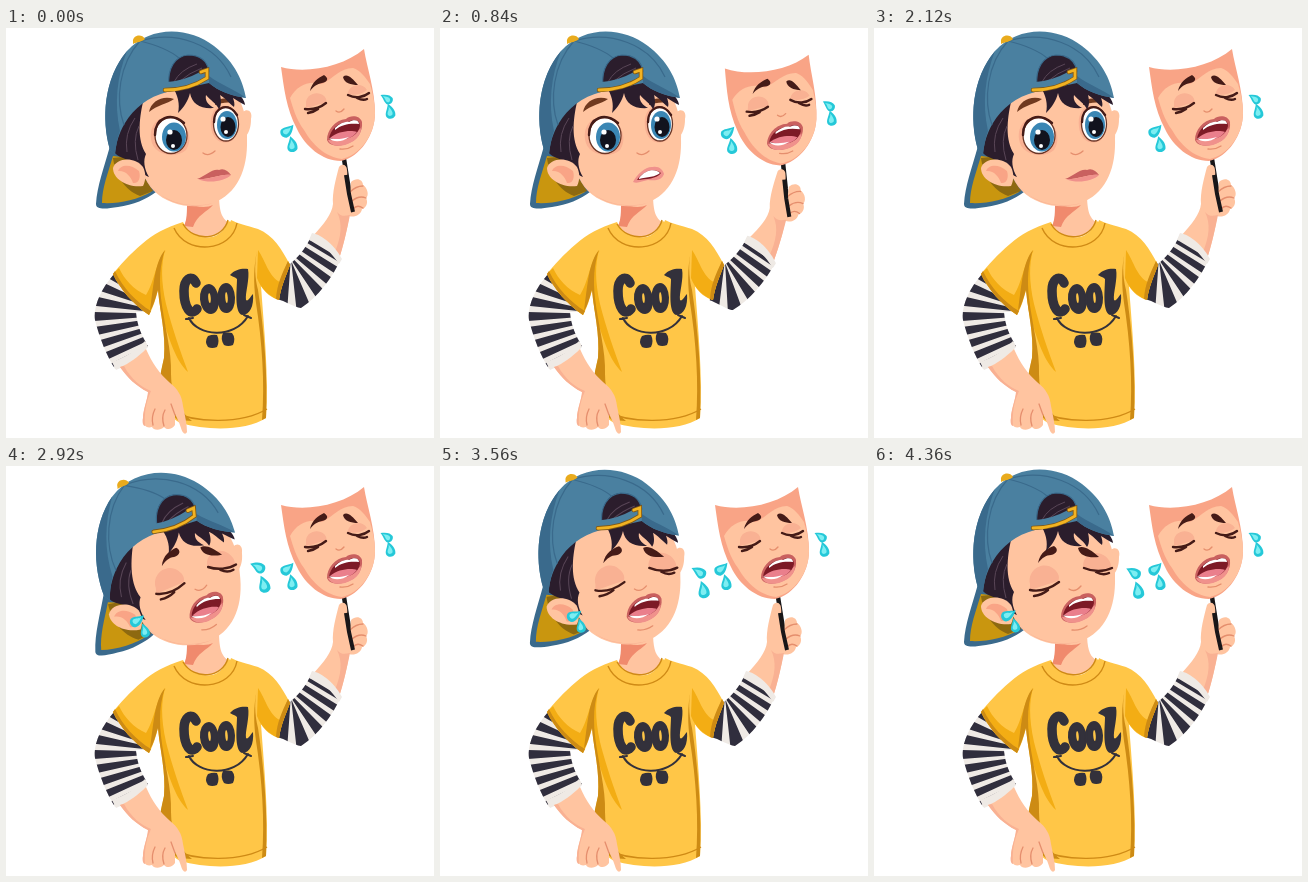
An HTML page for the animation above (4.68 s loop, 428 by 410 pixels).

```html
<!DOCTYPE html>
<html lang="en">
<head>
<meta charset="utf-8">
<title>Boy with a crying mask</title>
<style>
  html, body { margin: 0; width: 100%; height: 100%; overflow: hidden; background: #fff; }
  svg { display: block; width: 100%; height: 100%; fill: none; }
  .skin { fill: #ffc4a0; }
  .blush { fill: #f9a486; }
  .lid { fill: #f9b193; }
  .deep { fill: #f08a6d; }
  .crease { stroke: #e58e6d; stroke-width: 1.3; stroke-linecap: round; }
  .shirt { fill: #ffc647; }
  .mid { fill: #f3ad14; }
  .shade { fill: #cd8b14; }
  .seam { stroke: #cf8a15; stroke-width: 1.4; }
  .cloth { fill: #efeae5; }
  .bands { stroke: #302e3d; }
  .ink { fill: #33313b; }
  .inkLine { stroke: #33313b; stroke-linecap: round; }
  .cap { fill: #4a80a0; }
  .capDark { fill: #3a6a8c; }
  .capSeam { stroke: #3a6a8c; stroke-width: 1.2; }
  .gold { fill: #e9ab1d; }
  .under { fill: #c9960f; }
  .underDark { fill: #8d6910; }
  .hair { fill: #2b1d2c; }
  .strand { stroke: #594657; stroke-width: 1; }
  .brow { fill: #451b17; }
  .browLight { fill: #70391f; }
  .lash { stroke: #451b17; stroke-width: 2.4; stroke-linecap: round; }
  .rim { stroke: #6b3626; stroke-width: 1.3; }
  .white { fill: #fff; }
  .iris { fill: #3a86b4; }
  .pupil { fill: #12131e; }
  .lip { fill: #c9605f; }
  .lipLight { fill: #f0918c; }
  .gape { fill: #7d1a26; }
  .tongue { fill: #ea7f8c; }
  .stick { stroke: #191618; }
  .tear { fill: #25c8d8; }
  .tearLight { fill: #7deef2; }
</style>
</head>
<body>
<svg viewBox="0 0 428 410" preserveAspectRatio="none">
  <defs>
    <g id="drop">
      <path class="tear" d="M0-9C5-3 6 1 4.500 5C2 8-3 8-5 4C-6 0-2-3 0-9Z"/>
      <path class="tearLight" d="M0-6C2-2 3 1 2 3C0 5-3 4-3 2C-3-1 0-2 0-6Z"/>
    </g>
    <g id="wail">
      <path class="lip" d="M187 151C187 141 195 131 206 130C210 126 220 126 222 133C223 143 217 152 206 155C198 158 189 157 187 151Z"/>
      <path class="lipLight" d="M188 151C197 152 212 148 221 139C221 148 214 153 205 156C197 158 190 156 188 151Z"/>
      <path class="gape" d="M189 150C190 140 199 133 208 133C214 129 220 131 220 137C218 147 207 153 189 150Z"/>
      <path class="white" d="M195 139C200 134 206 132 209 133C214 130 219 131 219 135C211 134 202 135 195 141Z"/>
      <path class="tongue" d="M190 149C198 142 211 141 217 143C211 151 200 153 190 149Z"/>
      <path class="white" d="M189 149C194 151 203 150 209 148C203 153 193 154 189 149Z"/>
    </g>
    <clipPath id="rightSleeve"><path d="M270 228L284 236C296 226 302 216 306 206C316 208 328 220 335 231C326 250 312 269 295 280C288 279 279 273 271 271Z"/></clipPath>
    <clipPath id="leftSleeve"><path d="M108 246C94 262 87 280 89 292C94 312 101 328 109 341C120 336 132 326 142 318C136 308 131 298 130 284L143 284Z"/></clipPath>
  </defs>

  <g id="arm">
    <path class="stick" stroke-width="4.500" d="M338 131L342 156L347 183"/>
    <path class="skin" d="M307 208C318 196 326 186 327 176C326 165 330 150 333 139C336 135 341 137 341 142C342 148 340 152 341 156L344 166L345 154C350 149 357 151 357 157C362 160 363 168 360 170C363 175 359 181 356 181C355 187 348 190 343 188C342 198 338 215 333 231Z"/>
    <path class="lid" d="M331 184C335 189 339 188 344 187C341 202 337 219 333 231L329 224C335 209 337 196 331 184Z"/>
    <path class="crease" d="M344 164Q350 158 357 158M346 173Q353 167 360 170M347 181Q351 176 357 180"/>
    <path class="stick" stroke-width="4" d="M340 147L343 166L347 184"/>
    <g clip-path="url(#rightSleeve)">
      <path class="cloth" d="M260 200H340V290H260Z"/>
      <path class="bands" stroke-width="62" stroke-dasharray="6.500 4.500" stroke-dashoffset="4" d="M270 251C295 262 305 247 320 222"/>
    </g>
    <path class="cloth" d="M306 205C317 207 330 219 336 231L333 236C326 225 315 214 303 212Z"/>

    <path class="blush" d="M275 39C300 46 337 39 358 21C361 40 369 62 369 85C369 107 354 129 335 133C316 133 299 118 291 101C280 80 278 60 275 39Z"/>
    <path class="skin" d="M284 70C291 57 303 52 316 56C328 50 334 40 347 40C354 42 360 50 364 56C367 66 369 76 369 85C369 107 354 127 336 131C319 129 306 116 298 102C290 91 287 80 284 70Z"/>
    <path class="lid" d="M300 76C299 66 312 62 318 68C321 71 321 74 319 75C312 76 306 79 300 80ZM342 66C342 57 356 53 361 62C356 66 349 68 342 66Z"/>
    <path class="brow" d="M304 63C306 54 312 50 318 47C323 50 322 54 316 55C311 56 308 58 304 63ZM337 49C341 45 346 50 352 57C345 57 338 55 337 49Z"/>
    <path class="lash" d="M299 81C307 82 315 79 320 75M302 85Q308 84 312 81M342 67C350 71 358 69 363 65M351 70Q357 73 361 71"/>
    <path class="crease" d="M330 83Q334 86 338 81"/>
    <use href="#wail" x="134" y="-39"/>
    <path class="crease" d="M334 121Q341 122 347 118"/>
    <use href="#drop" transform="translate(281 103) rotate(45)"/>
    <use href="#drop" transform="translate(286 117) rotate(-12)"/>
    <use href="#drop" transform="translate(381 71) rotate(-58) scale(.85)"/>
    <use href="#drop" transform="translate(384 84) rotate(-15) scale(.95)"/>
  </g>

  <path class="skin" d="M181 160L181 188C180 195 178 197 177 199C188 216 214 213 222 194C216 190 213 184 213 165Z"/>
  <path class="deep" d="M181 174C190 180 201 180 207 177C201 184 191 187 187 199L178 198C181 192 181 184 181 174Z"/>

  <g clip-path="url(#leftSleeve)">
    <path class="cloth" d="M80 240H150V345H80Z"/>
    <path class="bands" stroke-width="70" stroke-dasharray="6.500 4.500" d="M122 254C107 274 108 300 124 330"/>
  </g>
  <path class="cloth" d="M106 334C118 330 131 322 139 313L142 319C134 328 122 337 110 342Z"/>

  <path class="shirt" d="M177 194C159 200 147 206 136 216C124 226 114 237 107 246C114 261 128 277 143 287C147 280 150 270 152 262C154 285 160 305 158 330C155 345 153 352 154 362C158 376 162 388 174 395C202 403 240 403 260 390C263 350 258 300 255 258C259 265 266 270 273 272C275 258 280 248 284 237C275 220 268 208 252 201C240 197 232 196 225 192C222 214 186 216 177 194Z"/>
  <path class="mid" d="M107 246C114 261 128 277 143 287C148 276 150 264 152 252C153 240 155 230 160 222C150 232 149 253 140 267C128 262 118 251 113 240ZM159 222C150 240 152 268 156 288C163 310 169 332 182 344C175 325 166 300 160 276C155 253 155 237 159 222ZM252 222C260 234 263 249 274 254L282 233L284 237C280 248 275 258 273 272C264 269 255 261 251 250Z"/>
  <path class="shade" d="M159 222C149 234 148 253 144 283C147 279 149 272 152 262C154 285 160 305 158 330C154 347 152 357 154 364C159 376 164 386 172 392L186 393C172 382 165 366 165 346C166 323 158 296 155 270C153 252 154 236 159 222Z"/>
  <path class="shade" d="M251 223C248 238 249 250 252 262C258 301 262 350 260 390L256 392C259 355 256 313 250 275C247 253 248 237 251 223Z"/>
  <path class="shade" d="M107 246C114 261 128 277 143 287L145 283C130 274 117 260 109 243ZM273 272C275 258 280 248 284 237L282 233C276 246 271 256 270 271Z"/>
  <path class="seam" stroke-width="2" d="M162 382C190 396 236 396 261 381"/>
  <path stroke="#ffc647" stroke-width="9" d="M173 198C184 222 220 219 226 194"/>
  <path class="seam" d="M177 196C188 215 217 212 222 192M168 200C180 228 226 224 231 195"/>

  <g aria-label="COOL">
    <path class="inkLine" stroke-width="9.500" d="M190 255C185 245 178 252 178 263C178 280 185 289 191 281"/>
    <path class="ink inkLine" stroke-width="2" fill-rule="evenodd" d="M203 257C213 258 216 284 205 285C193 285 191 258 203 257ZM203 264C200 265 201 276 204 276C207 276 206 264 203 264Z"/>
    <path class="ink inkLine" stroke-width="2" fill-rule="evenodd" d="M220 256C230 256 231 283 221 284C210 285 209 257 220 256ZM220 263C217 264 218 276 221 276C224 276 223 263 220 263Z"/>
    <path class="ink" d="M224 247C229 241 237 240 242 241C244 251 239 265 240 272C242 274 244 269 247 266C248 278 244 287 236 287C228 284 231 261 231 251C229 249 227 249 224 247Z"/>
    <path class="inkLine" stroke-width="2" d="M180 291L187 290M183 290C191 308 228 312 242 288M238 287L245 290"/>
    <path class="ink" d="M202 308Q207 306 211 307Q214 313 211 319Q206 321 202 319Q198 314 202 308ZM217 305Q223 304 226 305Q230 310 227 317Q222 319 218 317Q214 311 217 305Z"/>
  </g>

  <path class="skin" d="M114 339C123 336 133 328 140 321C146 335 154 346 163 354C172 361 176 368 177 378C179 388 181 396 181 404C179 408 176 404 175 400C173 394 171 390 169 386L169 397C166 402 160 402 158 399C154 403 147 402 146 399C140 401 136 396 137 390C137 382 142 370 142 364C130 358 122 350 114 339Z"/>
  <path class="lid" d="M114 339L118 338C125 351 135 359 145 363C140 374 138 385 139 398C137 398 136 394 137 390C137 382 142 370 142 364C130 358 122 350 114 339Z"/>
  <path class="crease" d="M147 397Q145 389 149 381M158 398Q155 389 159 382M169 387L165 376"/>

  <g id="head">
    <path class="capDark" d="M104 118C98 140 91 158 90 176C90 182 100 181 112 179C127 177 141 171 150 164L120 125Z"/>
    <path class="under" d="M107 128C102 145 96 160 96 175C112 176 131 172 145 164L124 130Z"/>
    <path class="underDark" d="M107 130C109 146 118 162 134 168L147 163L125 128Z"/>
    <path class="skin" d="M237 84C241 80 247 83 245 91C245 99 243 105 239 109Z"/>
    <path class="skin" d="M132 78C126 106 129 142 148 163C163 178 190 182 207 175C231 166 242 142 241 111C242 90 236 70 222 55L165 52Z"/>
    <path class="lid" d="M140 152C153 172 181 182 207 175C195 180 174 178 161 171C151 165 144 159 140 152Z"/>
    <path class="hair" d="M140 68C122 82 108 102 106 121C112 132 124 130 131 137C134 144 138 147 143 149C138 141 137 132 140 126C131 112 133 92 137 74Z"/>
    <path class="strand" d="M129 90Q118 106 121 124M133 98Q126 112 132 132"/>
    <path class="skin" d="M137 139C128 128 110 130 107 140C107 151 121 160 137 158C140 152 140 145 137 139Z"/>
    <path class="blush" d="M133 143C124 135 114 137 112 143C119 142 125 148 127 155C133 156 135 149 133 143Z"/>

    <g id="awake">
      <path class="lid" d="M145 111C143 93 158 85 171 91C183 96 187 112 180 122C170 131 147 128 145 111ZM205 99C203 84 211 76 221 78C233 81 235 103 227 112C216 119 206 111 205 99Z"/>
      <ellipse class="white rim" cx="165" cy="107.500" rx="16" ry="18"/>
      <ellipse class="white rim" cx="220" cy="96" rx="12.500" ry="17"/>
      <path class="lash" d="M149 107C149 89 165 84 178 95M208 94C208 78 223 74 231 87"/>
      <ellipse class="iris" cx="168" cy="109" rx="12" ry="14.500"/>
      <ellipse class="iris" cx="221" cy="97" rx="10" ry="14"/>
      <ellipse class="pupil" cx="168" cy="112" rx="8" ry="10"/>
      <ellipse class="pupil" cx="222" cy="99" rx="7.500" ry="10"/>
      <g class="white">
        <circle cx="164" cy="104" r="2.600"/><circle cx="167" cy="118" r="2"/>
        <circle cx="217" cy="91" r="2.600"/><circle cx="220" cy="104" r="2"/>
      </g>
      <path class="browLight" d="M143 84C145 73 157 67 168 71C161 76 151 77 143 84ZM209 75C214 69 222 69 228 75C220 74 215 75 209 77Z"/>
      <path class="crease" d="M197 125Q202 129 209 123"/>
      <g class="mouth">
        <path class="lip" d="M191 151C199 148 207 140 213 142C218 140 222 143 225 147C216 145 203 152 191 151Z"/>
        <path class="lipLight" d="M192 151C204 152 215 145 225 147C219 153 203 156 192 151Z"/>
      </g>
      <g class="mouth">
        <path class="lipLight" d="M193 154C197 146 206 138 213 139C219 138 223 142 224 146C222 152 216 153 208 152C202 153 198 156 193 154Z"/>
        <path class="gape" d="M197 152C204 142 215 140 221 145C217 151 206 151 197 152Z"/>
        <path class="white" d="M199 150C205 142 215 140 220 145C216 149 207 149 199 151Z"/>
      </g>
      <g class="mouth">
        <path class="lip" d="M197 155C199 146 205 140 212 139C218 139 222 145 221 150C218 157 202 160 197 155Z"/>
        <path class="gape" d="M200 153C202 146 207 142 213 142C218 143 219 147 217 151C213 154 205 156 200 153Z"/>
        <path class="white" d="M203 148C207 141 216 140 218 146C213 147 208 148 203 150Z"/>
        <path class="tongue" d="M203 153C207 150 213 149 216 151C212 155 207 156 203 153Z"/>
      </g>
    </g>

    <g id="crying">
      <path class="lid" d="M156 118C153 103 170 94 180 103C185 107 186 112 184 115C174 118 166 121 156 124ZM210 103C206 91 220 82 231 90C237 95 238 100 236 103C226 105 217 104 210 103Z"/>
      <path class="brow" d="M164 97C166 86 174 82 180 80C185 83 183 88 177 89C172 89 168 92 164 97ZM204 82C209 79 216 83 225 91C216 92 206 91 204 82Z"/>
      <path class="lash" d="M156 124C166 126 177 122 185 116M160 130Q168 129 174 124M210 102C219 106 230 106 238 102M222 106Q229 110 235 107"/>
      <path class="crease" d="M195 123Q201 127 207 120"/>
      <use href="#wail"/>
      <path class="crease" d="M198 164Q206 165 213 160"/>
      <use href="#drop" transform="translate(134 149) rotate(58)"/>
      <use href="#drop" transform="translate(141 160) rotate(-14) scale(.9)"/>
      <use href="#drop" transform="translate(260 107) rotate(-60)"/>
      <use href="#drop" transform="translate(264 125) rotate(-15) scale(1.100)"/>
    </g>

    <path class="hair" d="M166 58C172 67 174 76 172 85C178 79 182 73 184 65C186 76 194 81 208 80C201 76 199 72 200 67C204 72 210 75 213 81C216 77 215 71 214 67C219 70 222 74 228 79C229 76 228 73 227 70C231 72 234 75 239 77C239 73 234 66 228 60L205 48Z"/>
    <path class="cap" d="M104 122C95 91 98 50 121 23C145-3 183-1 208 18C230 35 237 54 240 70C226 68 212 63 203 55L161 64C142 69 128 80 119 95C112 107 110 116 109 126Z"/>
    <path class="capDark" d="M104 122C95 91 98 50 121 23C111 49 108 75 114 103C111 111 110 119 109 126Z"/>
    <path class="capDark" d="M203 48C215 57 228 61 240 70C226 68 212 63 203 55Z"/>
    <path class="capSeam" d="M134 13C113 36 109 72 118 97M134 13C154 18 166 24 173 30M134 13C170 2 210 16 225 49"/>
    <path class="hair capSeam" d="M163 58C161 41 169 28 182 27C194 27 201 33 203 43L200 50Z"/>
    <path class="strand" d="M168 54Q174 42 191 36M174 53Q183 45 196 40"/>
    <path stroke="#4a80a0" stroke-width="8" stroke-linecap="round" d="M162 58C175 57 186 53 197 47"/>
    <path stroke="#805815" stroke-width="4.500" stroke-linecap="round" d="M159 62C173 62 189 58 201 50L201 42L195 44"/>
    <path stroke="#f2b322" stroke-width="2.800" stroke-linecap="round" d="M159 62C173 62 189 58 201 50L201 42L195 44"/>
    <path class="gold" d="M127 14C126 7 136 5 139 11C136 14 131 14 127 16Z"/>
  </g>
</svg>
<script>
  const LOOP = 4680, STEP = 40;
  const ARM = { start: 0, end: 2120, cycles: 4, pivot: '252 232', keys: [[0, 0], [.28, -9.2], [.7, 5.5], [1, 0]] };
  const HEAD = { start: 2640, end: 4360, cycles: 3, pivot: '195 188', keys: [[0, 0], [.4, -6.6], [.8, 5.2], [1, 0]] };
  const TALK = [2, 0, 1], TALK_STEP = 160;

  const byId = id => document.getElementById(id);
  const arm = byId('arm'), head = byId('head'), awake = byId('awake'), crying = byId('crying');
  const mouths = document.querySelectorAll('.mouth');
  const show = (el, on) => { el.style.display = on ? '' : 'none'; };

  function sway(t, { start, end, cycles, keys }) {
    if (t <= start || t >= end) return 0;
    const phase = (t - start) / (end - start) * cycles % 1;
    const next = keys.findIndex(([at]) => at > phase);
    const [t0, a0] = keys[next - 1], [t1, a1] = keys[next];
    return a0 + (a1 - a0) * (1 - Math.cos(Math.PI * (phase - t0) / (t1 - t0))) / 2;
  }

  function swing(el, t, motion) {
    el.setAttribute('transform', `rotate(${sway(t, motion).toFixed(3)} ${motion.pivot})`);
  }

  function draw(now) {
    const t = Math.floor(now % LOOP / STEP) * STEP;
    swing(arm, t, ARM);
    swing(head, t, HEAD);
    const sad = t > HEAD.start;
    show(awake, !sad);
    show(crying, sad);
    const talking = t > 0 && t < ARM.end;
    const shape = talking ? TALK[Math.floor(t / TALK_STEP) % TALK.length] : 0;
    mouths.forEach((mouth, i) => show(mouth, i === shape));
  }

  function tick() {
    draw(performance.now());
    requestAnimationFrame(tick);
  }
  tick();
</script>
</body>
</html>
```
